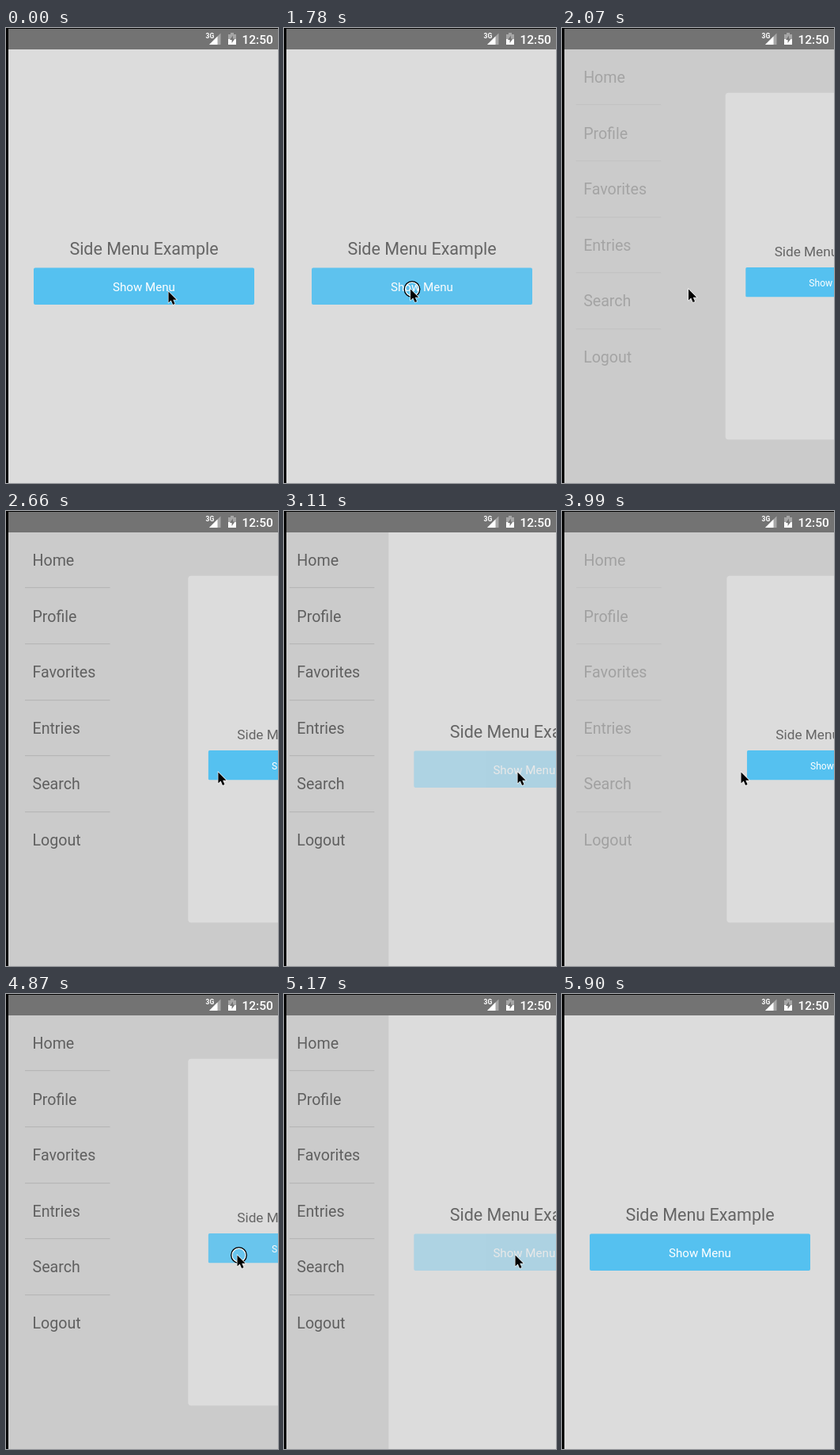
These frames come from a looping animation (344 px wide and 574 px high, 6 s). An HTML page:

```html
<!DOCTYPE html>
<html lang="en">
<head>
<meta charset="utf-8">
<title>Side Menu Example</title>
<style>
  html, body { margin: 0; width: 100%; height: 100%; overflow: hidden; background: #000; }
  svg { display: block; width: 344px; height: 574px; font-family: Roboto, sans-serif; }
</style>
</head>
<body>
<svg viewBox="0 0 344 574">
  <defs>
    <clipPath id="screen"><rect x="3" y="27" width="341" height="547"/></clipPath>
  </defs>
  <rect width="344" height="574"/>

  <g clip-path="url(#screen)">
    <rect x="3" y="27" width="341" height="547" fill="#cbcbcb"/>
    <g id="menu" font-size="19.6" fill="#606060"></g>
    <g id="content">
      <rect id="panel" x="3" y="27" width="343" height="547" fill="#dcdcdc"/>
      <text x="174.5" y="285.5" font-size="21.5" fill="#656565" text-anchor="middle">Side Menu Example</text>
      <g id="button">
        <rect x="35" y="302.5" width="279" height="46.5" rx="2" fill="#55c1f0"/>
        <text x="174.5" y="332" font-size="15.1" fill="#fff" text-anchor="middle">Show Menu</text>
      </g>
    </g>
  </g>

  <g id="status">
    <rect x="3" y="1" width="341" height="26" fill="#737373"/>
    <g fill="#fff">
      <text x="252.5" y="13" font-size="8.5" font-weight="700">3G</text>
      <path d="M271.5 6.5V21H257z" fill="#a6a6a6"/>
      <path d="M267.5 10.5V21H257z"/>
      <path d="M281 8h3V6h4v2h3v6h-10z" fill="#a6a6a6"/>
      <path d="M281 14h10v7h-10z"/>
      <path d="M287 9.5l-4 5.5h2.6v4l3.8-5.500h-2.400z" fill="#737373"/>
      <text x="298.500" y="20" font-size="15.500" font-weight="500">12:50</text>
    </g>
  </g>

  <g id="cursor">
    <g id="ring" fill="none">
      <circle cx="2" cy=".5" r="8.700" stroke="#fff" stroke-width="1.500"/>
      <circle cx="2" cy=".5" r="9.800" stroke="#000" stroke-width="1.300"/>
    </g>
    <path d="M0 .5V14.500L3.200 11.600 5.600 17 8.100 15.900 5.800 10.700H10.200z"
          stroke="#fff" stroke-width="1.200" paint-order="stroke"/>
  </g>
</svg>

<script>
const LOOP = 6000, TICK = 147.6;
const SLIDE = 193, MENU_SHIFT = 52, RATE = 1.5;
const CENTER_X = 174.5, CENTER_Y = 300.3;

// All times below are counted in ticks.
const toggles = [
  { at: 12.6, open: true }, { at: 20.733, open: false },
  { at: 25.55, open: true }, { at: 34.733, open: false }
];
const clicks = [7, 12, 20, 25, 33, 34];
const cursorX = [[1, 205.5], [4, 198], [10, 198], [11, 176], [12, 160], [14, 160],
  [19, 295.5], [21, 295.5], [25, 226.5], [27, 226.5], [32, 292.5], [35, 292.5], [40, 205]];
const cursorY = [[1, 332], [6, 332], [7, 331], [10, 331], [12, 329], [40, 329]];
const buttonAlpha = [[11, 1], [12, .93], [13, .4], [14, 1], [19, 1], [20, .8], [21, .34],
  [23, 1], [25, 1], [26, .4], [27, 1], [32, 1], [33, .85], [34, .2], [35, .34], [37, 1]];

const el = id => document.getElementById(id);
const clamp = v => Math.min(1, Math.max(0, v));

function along(keys, t) {
  const next = keys.findIndex(key => key[0] > t);
  if (next === 0) return keys[0][1];
  if (next < 0) return keys[keys.length - 1][1];
  const [t0, a] = keys[next - 1], [t1, b] = keys[next];
  return a + (b - a) * (t - t0) / (t1 - t0);
}

el("menu").innerHTML = ["Home", "Profile", "Favorites", "Entries", "Search", "Logout"]
  .map((label, i, all) => {
    const y = 69 + 70.6 * i;
    const line = `<rect x="24" y="${Math.round(y + 27.3)}" width="107.5" height="1.2" fill="#b6b6b6"/>`;
    return `<text x="33.5" y="${y}">${label}</text>` + (i < all.length - 1 ? line : "");
  }).join("");

function menuState(tick) {
  const last = toggles.filter(toggle => toggle.at <= tick).pop();
  if (!last) return { progress: 0, alpha: 0 };
  const age = tick - last.at;
  let left = Math.exp(-RATE * age);
  if (left < .01) left = 0;
  return last.open
    ? { progress: 1 - left, alpha: clamp((age - .75) / 1.8) }
    : { progress: left, alpha: 1 };
}

function draw(time) {
  const tick = Math.floor((time % LOOP + 6) / TICK);
  const { progress, alpha } = menuState(tick);
  // The panel only shrinks near the end of its slide.
  const shrink = clamp((progress - .68) / .19);
  const scale = 1 - .2 * shrink;

  el("menu").setAttribute("transform", `translate(${-MENU_SHIFT * (1 - progress)})`);
  el("menu").setAttribute("opacity", alpha);
  el("content").setAttribute("transform",
    `translate(${CENTER_X + SLIDE * progress} ${CENTER_Y}) scale(${scale}) translate(${-CENTER_X} ${-CENTER_Y})`);
  el("panel").setAttribute("rx", 5 * shrink);
  el("button").setAttribute("opacity", along(buttonAlpha, tick));

  el("cursor").setAttribute("transform", `translate(${along(cursorX, tick)} ${along(cursorY, tick)})`);
  el("cursor").setAttribute("visibility", tick < 40 ? "visible" : "hidden");
  el("ring").setAttribute("display", clicks.includes(tick) ? "inline" : "none");
}

const start = performance.now();
function loop() {
  draw(performance.now() - start);
  requestAnimationFrame(loop);
}
loop();
</script>
</body>
</html>
```
